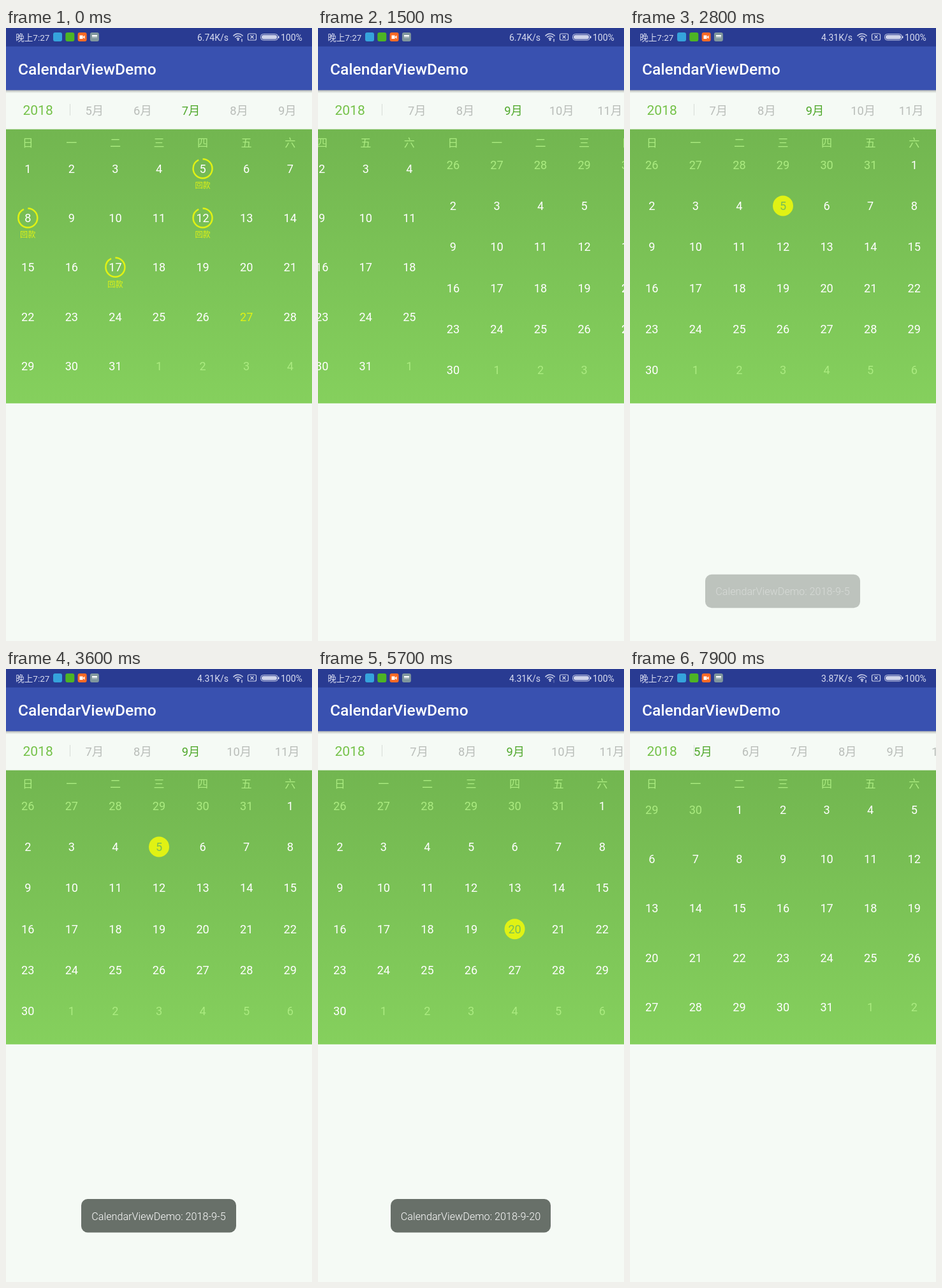
Write an HTML page with a canvas that moves like this. It is 480 px wide and 960 px high and loops after 8 s.

```html
<!DOCTYPE html>
<html lang="zh">
<head>
<meta charset="utf-8">
<title>CalendarViewDemo</title>
<style>
html, body { margin: 0; width: 480px; height: 960px; overflow: hidden; background: #f5faf5; }
canvas { display: block; }
</style>
</head>
<body>
<canvas id="stage" width="480" height="960"></canvas>
<script>
const ctx = document.getElementById('stage').getContext('2d');
const LOOP = 8000, COL = 480 / 7, STEP = 75.6;
const FONT = 'Roboto, "Noto Sans CJK SC", "Noto Sans CJK", sans-serif';
const YELLOW = '#e0f214', PALE = '#abeb80', ICON = '#cdd2ea';
const WEEK = '日一二三四五六';
const REPAYMENTS = [5, 8, 12, 17], TODAY = 27;

const quad = k => 1 - (1 - k) ** 2;
const quint = k => 1 - (1 - k) ** 5;
const accel = k => k * k;
const smooth = k => k * k * (3 - 2 * k);
const clamp = k => Math.min(1, Math.max(0, k));

// Moves of the form [from ms, to ms, value reached, easing]
const PAGE = [
  [350, 560, 7.167, accel], [560, 1160, 8, quint],
  [1260, 1400, 8.07, accel], [1400, 2000, 9, quint],
  [6494, 7094, 5, quint]
];
const RIBBON = [
  [560, 795, 8, quad], [1400, 1590, 9, quad],
  [5550, 6250, 6.8, smooth], [6494, 6729, 5, quad],
  [7450, 8000, 7.4, quad]
];
const TOASTS = [
  { text: '2018-9-5', w: 243, from: 2756, to: 4690 },
  { text: '2018-9-20', w: 251, from: 4704, to: 6705 }
];

function track(t, value, moves) {
  for (const [from, to, goal, ease] of moves)
    if (t > from) value += (goal - value) * ease(clamp((t - from) / (to - from)));
  return value;
}

function text(str, x, y, size, color, align = 'center', weight = 400) {
  ctx.font = `${weight} ${size}px ${FONT}`;
  ctx.textAlign = align;
  ctx.fillStyle = color;
  ctx.fillText(str, x, y);
}

function rect(x, y, w, h, color) {
  ctx.fillStyle = color;
  ctx.fillRect(x, y, w, h);
}

function round(x, y, w, h, r, color, stroke) {
  ctx.beginPath();
  ctx.roundRect(x, y, w, h, r);
  ctx[stroke ? 'strokeStyle' : 'fillStyle'] = color;
  stroke ? ctx.stroke() : ctx.fill();
}

function arc(x, y, r, a, b, color, width) {
  ctx.beginPath();
  ctx.arc(x, y, r, a, b);
  ctx.strokeStyle = color;
  ctx.lineWidth = width;
  ctx.stroke();
}

function line(points, color, width) {
  ctx.beginPath();
  points.forEach(([x, y]) => ctx.lineTo(x, y));
  ctx.strokeStyle = color;
  ctx.lineWidth = width;
  ctx.stroke();
}

function fade(y, h, top, bottom) {
  const g = ctx.createLinearGradient(0, y, 0, y + h);
  g.addColorStop(0, top);
  g.addColorStop(1, bottom);
  rect(0, y, 480, h, g);
}

function statusBar(t) {
  rect(0, 0, 480, 28.9, '#293b92');
  text('晚上7:27', 15.3, 19.5, 13.5, '#d9ddf0', 'left');
  ['#35a3dc', '#4db424', '#fa6a25', '#80979d'].forEach((c, i) => round(74 + 19.3 * i, 7, 14, 14, 3, c));
  rect(115.5, 11.5, 5, 5.5, '#fff');
  ctx.beginPath();
  ctx.moveTo(120.5, 14.2);
  ctx.lineTo(123.5, 11.5);
  ctx.lineTo(123.5, 17);
  ctx.fill();
  rect(135, 11, 8, 2.5, '#fff');
  rect(135, 14.5, 8, 1, '#c5d0d3');

  const speed = t < 2200 ? '6.74' : t < 6000 ? '4.31' : '3.87';
  text(speed + 'K/s', 349, 19.5, 14, '#d9ddf0', 'right');
  for (const r of [3, 6.5, 10]) arc(364, 19, r, -Math.PI * .77, -Math.PI * .23, ICON, 1.5);
  arc(364, 18.5, .8, 0, 7, ICON, 1.5);
  const busy = t < 4600 || t > 7200;
  line([[370, 17], [370, 21.5]], busy ? ICON : '#6472b2', 1.4);
  ctx.lineWidth = 1.2;
  round(379.5, 9, 13, 10, 2, ICON, true);
  line([[383.5, 11.5], [388.5, 16.5]], ICON, 1.2);
  line([[388.5, 11.5], [383.5, 16.5]], ICON, 1.2);
  ctx.lineWidth = 1;
  round(399.5, 9.5, 27, 9.5, 4, ICON, true);
  round(401, 11, 24, 6.5, 3, ICON);
  rect(427, 12.5, 1.5, 3.5, ICON);
  text('100%', 431, 19.5, 14, '#d9ddf0', 'left');
}

function appBar() {
  fade(97, 5, 'rgba(0,0,0,.28)', 'rgba(0,0,0,0)');
  rect(0, 28, 480, 69.3, '#3951b0');
  text('CalendarViewDemo', 18.9, 73, 24.6, '#fff', 'left', 500);
}

function ribbon(t) {
  const pos = track(t, 7, RIBBON);
  const active = t < 560 ? 7 : t < 1400 ? 8 : t < 6494 ? 9 : 5;
  text('2018', 26.5, 136.3, 21, '#73c147', 'left');
  rect(100, 119, 1, 18, '#d8ddd8');
  ctx.save();
  ctx.beginPath();
  ctx.rect(99, 102, 381, 56);
  ctx.clip();
  for (let m = 1; m <= 12; m++)
    text(m + '月', 290 + (m - pos) * STEP, 135.5, 18.33, m === active ? '#50a82c' : '#b9bdb9');
  ctx.restore();
}

function monthPage(month, left, t) {
  const first = new Date(2018, month - 1, 1).getDay();
  const count = new Date(2018, month, 0).getDate();
  const rows = Math.ceil((first + count) / 7), rowH = 386 / rows;
  const picked = month !== 9 || t < 2650 ? 0 : t < 3950 ? 5 : 20;
  for (let i = 0; i < rows * 7; i++) {
    const x = left + (i % 7 + .5) * COL;
    const y = 182 + (Math.floor(i / 7) + .5) * rowH;
    const day = i - first + 1;
    const inside = day > 0 && day <= count;
    let color = inside ? '#fff' : PALE;
    if (i < 7) text(WEEK[i], x, 186, 17.1, PALE);
    if (inside && day === picked) {
      ctx.beginPath();
      ctx.arc(x, y, 16, 0, 7);
      ctx.fillStyle = YELLOW;
      ctx.fill();
      color = '#79be55';
    }
    if (month === 7 && inside) {
      if (day === TODAY) color = YELLOW;
      if (REPAYMENTS.includes(day)) {
        arc(x, y - .3, 15, -Math.PI / 2, Math.PI * 1.36, YELLOW, 2.5);
        text('回款', x, y + 30.5, 12.2, YELLOW);
      }
    }
    text(new Date(2018, month - 1, day).getDate(), x, y + 6.4, 18.1, color);
  }
}

function calendar(t) {
  const pos = track(t, 7, PAGE), month = Math.floor(pos);
  fade(158.6, 429.2, '#72b650', '#85d05d');
  monthPage(month, (month - pos) * 480, t);
  if (pos > month) monthPage(month + 1, (month + 1 - pos) * 480, t);
}

function toast({ text: date, w, from, to }, t) {
  const shown = quad(clamp((t - from) / 200));
  const alpha = shown * (1 - clamp((t - to) / 200));
  if (!alpha) return;
  const y = 830 + 43 * (1 - shown);
  ctx.globalAlpha = alpha;
  round(239.5 - w / 2, y, w, 52.4, 10, 'rgba(58,66,59,.75)');
  text('CalendarViewDemo: ' + date, 239.5, y + 32.5, 16.2, '#fff', 'center', 300);
  ctx.globalAlpha = 1;
}

function draw(now) {
  const t = now % LOOP;
  rect(0, 0, 480, 960, '#f5faf5');
  calendar(t);
  ribbon(t);
  appBar();
  statusBar(t);
  TOASTS.forEach(item => toast(item, t));
}

const start = performance.now();
function loop() {
  draw(performance.now() - start);
  requestAnimationFrame(loop);
}
loop();
</script>
</body>
</html>
```
